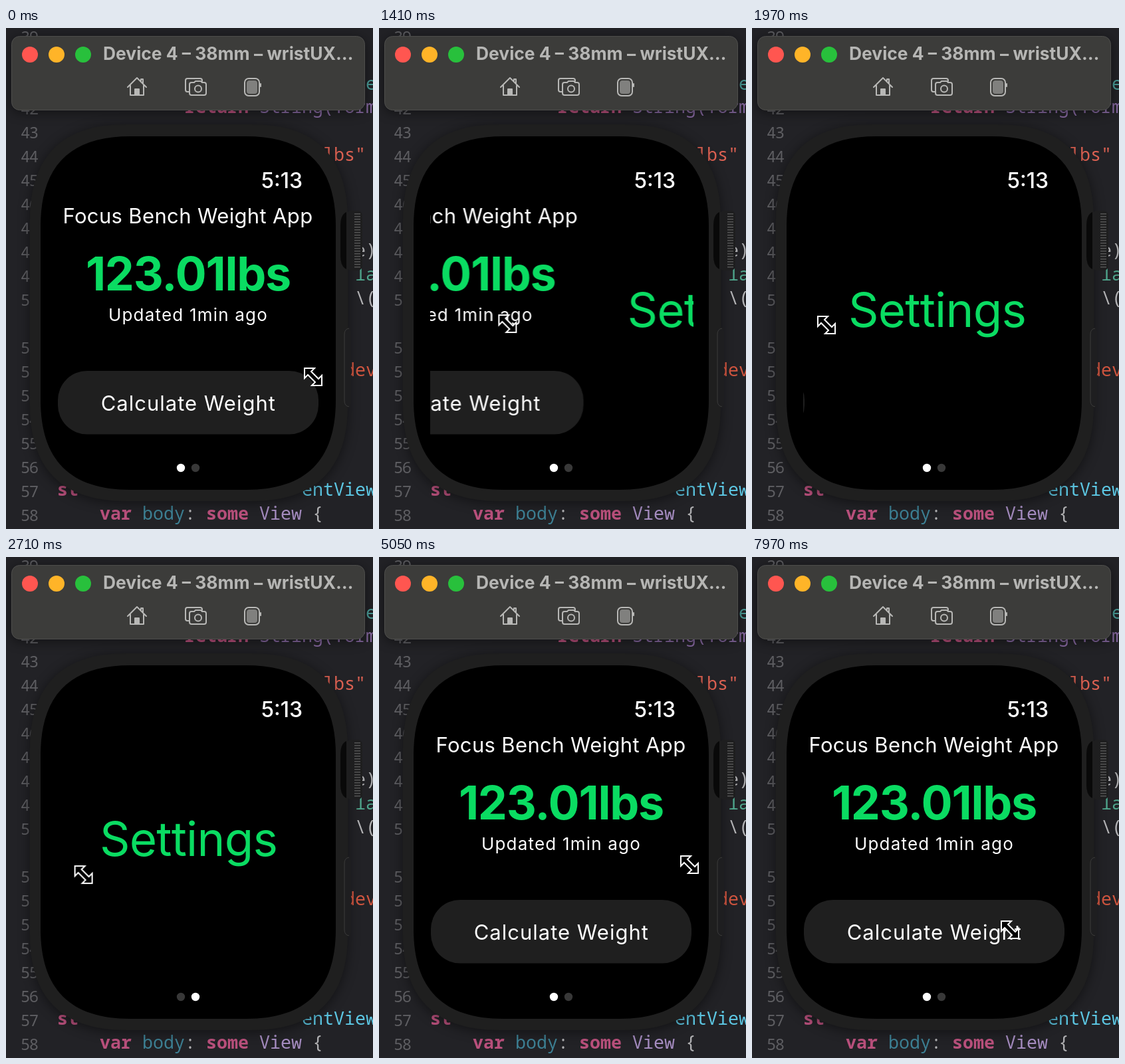
Animation of 552 by 754 pixels, one loop 7.99 s. Source, as an HTML page:

```html
<!DOCTYPE html>
<html lang="en">
<head>
<meta charset="utf-8">
<title>Weight app preview</title>
<style>
  html, body { margin: 0; width: 100%; height: 100%; overflow: hidden; background: #222226; }
  svg { display: block; width: 552px; height: 754px; }
  text { font-family: Inter, "Open Sans", sans-serif; white-space: pre; }
  .code text { font: 500 26.67px "Noto Sans Mono", "DejaVu Sans Mono", monospace; }
  .code .num { font-size: 24px; letter-spacing: -1.6px; fill: #5e5e62; }
  .code .key { font-weight: 700; fill: #b9507c; }
  .icons { fill: none; stroke: #b8b8b6; stroke-width: 2; stroke-linejoin: round; stroke-linecap: round; }
  .ui { fill: #fff; }
  .green { fill: #0adc62; }
  .raised { filter: drop-shadow(0 3px 9px #0007); }

  .pages, .cursor, .dot { animation: 7990ms linear infinite; }
  .pages { animation-name: swipe; }
  .cursor { animation-name: point; }
  .home { animation-name: homeDot; }
  .settings { animation-name: settingsDot; }

  @keyframes swipe {
    0% { transform: translateX(0); }
    11.139% { transform: translateX(0); animation-timing-function: cubic-bezier(.45, 0, .75, .7); }
    17.647% { transform: translateX(-162px); }
    19.9% { transform: translateX(-244px); animation-timing-function: cubic-bezier(.25, .45, .45, 1); }
    24.656% { transform: translateX(-391px); animation-timing-function: ease-out; }
    27% { transform: translateX(-395px); }
    53.19% { transform: translateX(-395px); }
    53.191%, 100% { transform: translateX(0); }
  }
  @keyframes point {
    0% { transform: translate(462px, 525px); animation-timing-function: ease-in-out; }
    5.257% { transform: translate(372px, 441px); }
    11.139% { transform: translate(372px, 441px); animation-timing-function: cubic-bezier(.45, 0, .75, .7); }
    17.647% { transform: translate(194px, 445px); animation-timing-function: ease-out; }
    20.4% { transform: translate(112px, 447px); }
    24.656% { transform: translate(112px, 447px); animation-timing-function: ease-in-out; }
    44.18% { transform: translate(122px, 515px); }
    53.19% { transform: translate(122px, 515px); }
    53.191% { transform: translate(470px, 468px); animation-timing-function: step-end; }
    63.204% { transform: translate(467px, 463px); animation-timing-function: ease-in-out; }
    83.73% { transform: translate(409px, 436px); animation-timing-function: ease-in-out; }
    99.75%, 100% { transform: translate(388px, 561px); }
  }
  @keyframes homeDot {
    0%, 53.191%, 100% { fill: #fff; animation-timing-function: step-end; }
    28.16% { fill: #383838; animation-timing-function: step-end; }
  }
  @keyframes settingsDot {
    0%, 53.191%, 100% { fill: #383838; animation-timing-function: step-end; }
    28.16% { fill: #fff; animation-timing-function: step-end; }
  }
</style>
</head>
<body>
<svg viewBox="0 0 552 754">
  <defs>
    <clipPath id="view"><rect x="77" y="250" width="396" height="390"/></clipPath>
  </defs>

  <g class="code">
    <g id="nums"></g>
    <text x="541" y="93" fill="#4b9f9a">e</text>
    <text x="269" y="128" class="key">return</text>
    <text x="381" y="128" fill="#8668a0">String(form</text>
    <text x="477" y="200" fill="#dc6152">lbs"</text>
    <text x="525" y="344" fill="#aaaaac">e)</text>
    <text x="525" y="380" fill="#4fa58c">la</text>
    <text x="525" y="416" fill="#b4b4b6">\(</text>
    <text x="509" y="524" fill="#d0553f">dev</text>
    <text x="77" y="704" class="key">st</text>
    <text x="445" y="704" fill="#5cc6e2">entView</text>
    <text x="141" y="740" class="key">var</text>
    <text x="205" y="740" fill="#3d8094">body<tspan fill="#b0b0b2">:</tspan></text>
    <text x="301" y="740" class="key">some</text>
    <text x="381" y="740" fill="#a58cc0">View <tspan fill="#b0b0b2">{</tspan></text>
  </g>

  <path id="case" class="raised" fill="#1f1f1f"/>
  <rect x="509" y="452" width="10" height="118" rx="4" fill="#1e1e20"/>
  <path d="M516 452q-7 1-7 9v100q0 8 7 9" fill="none" stroke="#3c3c3a"/>
  <path d="M512 277q-9 4-9 20v46q0 16 9 20z" fill="#090909"/>
  <rect x="512" y="275" width="24" height="90" rx="7" fill="#1e1e1f"/>
  <path d="M528.5 279V363" stroke="#555" stroke-width="9" stroke-dasharray="1.5 2.5"/>
  <path id="screen"/>

  <rect class="raised" x="8.5" y="12.5" width="531" height="111" rx="12" fill="#3c3c3a" stroke="#4e4e4c"/>
  <circle cx="36" cy="40" r="12" fill="#ff5650"/>
  <circle cx="76" cy="40" r="12" fill="#ffb428"/>
  <circle cx="116" cy="40" r="12" fill="#28c03c"/>
  <text x="146" y="48" font-size="26.4" font-weight="700" fill="#b6b6b4">Device 4 – 38mm – wristUX…</text>
  <g class="icons">
    <path d="M183 89 197 75 211 89M187 86V101H207V86M206 83V77H203V80"/>
    <path d="M194 100V92H200V100Z" fill="#b8b8b6"/>
    <path d="M275 96H273Q270 96 270 93V79Q270 76 273 76H292Q295 76 295 79V80"/>
    <path d="M279 82H283L285 80H293L295 82H298Q301 82 301 85V98Q301 101 298 101H279Q276 101 276 98V85Q276 82 279 82Z"/>
    <circle cx="289" cy="91.5" r="5"/>
    <rect x="359" y="76" width="22" height="26" rx="6"/>
    <rect x="362.5" y="79.5" width="15" height="19" rx="3" fill="#80807e" stroke="#80807e" stroke-width="1"/>
    <path d="M383 84V88"/>
  </g>

  <text class="ui" x="446" y="241" font-size="32" font-weight="500" text-anchor="end">5:13</text>
  <g clip-path="url(#view)">
    <g class="pages" text-anchor="middle">
      <text class="ui" x="273.5" y="294" font-size="31" letter-spacing=".35">Focus Bench Weight App</text>
      <text class="green" x="274" y="395" font-size="70" font-weight="700" letter-spacing="-1.2">123.01lbs</text>
      <text class="ui" x="274" y="441" font-size="26" letter-spacing="1.2">Updated 1min ago</text>
      <rect x="78" y="516" width="392" height="95.5" rx="44" fill="#1f1f1f"/>
      <text class="ui" x="274.3" y="576" font-size="31" letter-spacing="1">Calculate Weight</text>
      <text class="green" x="669.5" y="450" font-size="71" letter-spacing="-.8">Settings</text>
    </g>
  </g>
  <circle class="dot home" cx="263" cy="662" r="6.2"/>
  <circle class="dot settings" cx="285" cy="662" r="6.2"/>

  <path class="cursor" d="M-13-13H2L-3-8 8 3 13-2V13H-2L3 8-8-3-13 2Z" fill="#000" stroke="#fff" stroke-width="2"/>
</svg>
<script>
  // Rounded box whose corners ease into the sides, e = corner extent
  function squircle(x, y, r, b, e) {
    const k = e * .33;
    return `M${x + e} ${y}H${r - e}C${r - k} ${y} ${r} ${y + k} ${r} ${y + e}` +
      `V${b - e}C${r} ${b - k} ${r - k} ${b} ${r - e} ${b}` +
      `H${x + e}C${x + k} ${b} ${x} ${b - k} ${x} ${b - e}` +
      `V${y + e}C${x} ${y + k} ${x + k} ${y} ${x + e} ${y}Z`;
  }
  document.getElementById("case").setAttribute("d", squircle(36, 145, 514, 712, 145));
  document.getElementById("screen").setAttribute("d", squircle(52, 163, 496, 695, 135));

  // Line 50 wraps, so the later numbers sit one row lower
  let nums = "";
  for (let n = 39; n <= 58; n++) {
    const y = 22 + (n - 39 + (n > 50 ? 1 : 0)) * 36;
    nums += `<text class="num" x="22" y="${y}">${n}</text>`;
  }
  document.getElementById("nums").innerHTML = nums;
</script>
</body>
</html>
```
